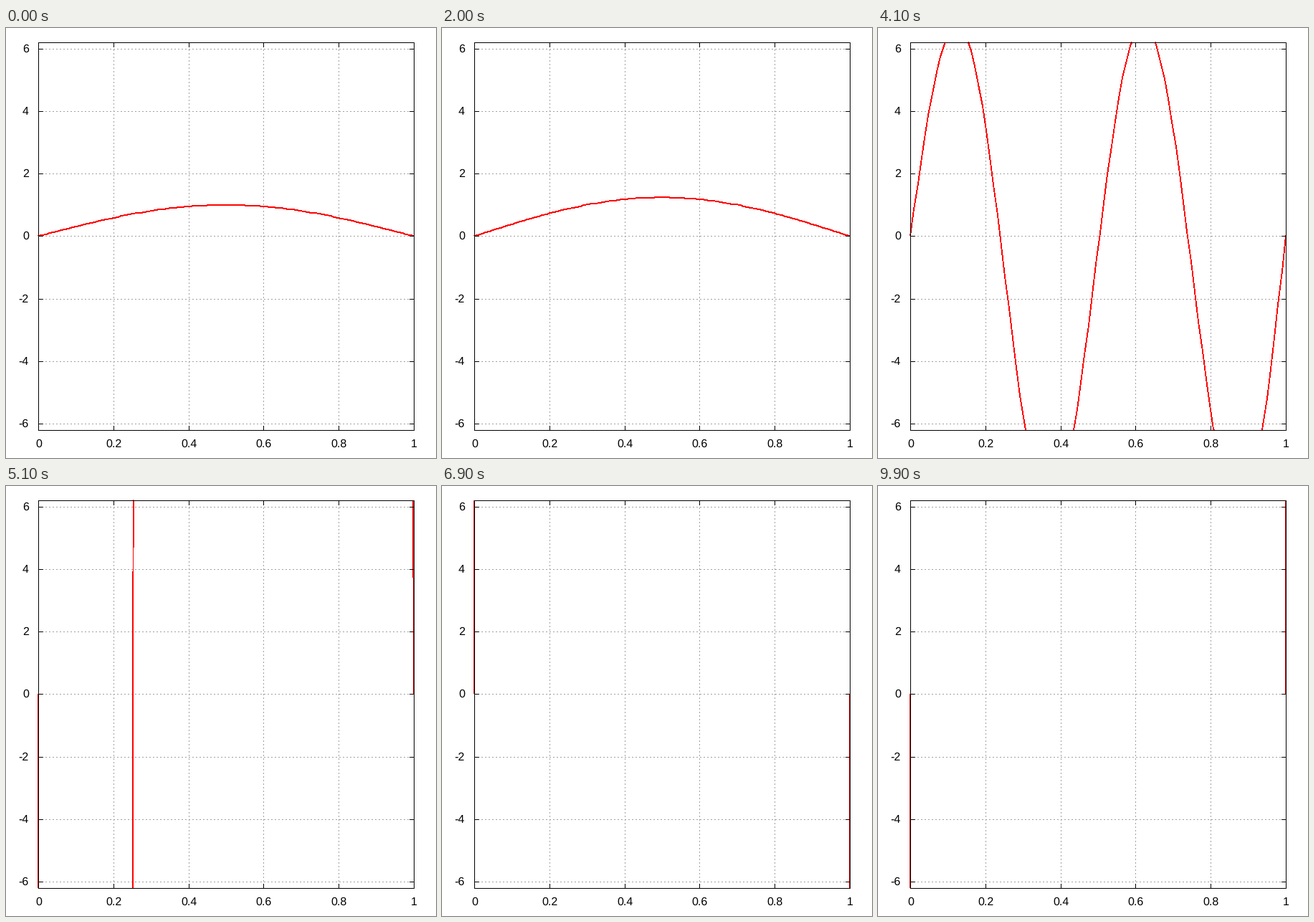
A matplotlib script for the animation above (10000 ms loop, 600 by 600 pixels).

```python
import matplotlib.pyplot as plt
import numpy as np
from matplotlib.animation import FuncAnimation
from matplotlib.patches import Rectangle

SIZE, DPI = 600, 100
PX = 72 / DPI
LEFT, RIGHT, TOP, BOTTOM = 45, 569, 20, 561
LIMIT = 6.2
FRAMES, INTERVAL = 100, 100
x = np.arange(100) / 99

plt.rcParams["text.hinting"] = "none"
fig = plt.figure(figsize=(SIZE / DPI, SIZE / DPI), dpi=DPI, facecolor="white")
ax = fig.add_axes([0, 0, 1, 1])
ax.set_xlim(0, SIZE)
ax.set_ylim(SIZE, 0)
ax.axis("off")


def to_px(v, u):
    """Data point to whole pixels."""
    px = LEFT + (RIGHT - LEFT) * v
    py = (TOP + BOTTOM) / 2 - (BOTTOM - TOP) / (2 * LIMIT) * u
    return np.round(px), np.ceil(py - 0.5)


def rule(xs, ys, color="black", z=5, **kw):
    ax.plot(xs, ys, color=color, lw=PX, zorder=z, snap=False,
            solid_capstyle="butt", dash_capstyle="butt", **kw)


def label(px, py, text, ha):
    ax.text(px, py, text, ha=ha, va="baseline", fontsize=16 * PX,
            family="Liberation Sans", color="black")


def draw_axes():
    l, r, t, b = LEFT, RIGHT + 1, TOP, BOTTOM + 1
    tick = 7
    dots = dict(color="#a0a0a0", z=1, linestyle=(0, (2, 3)))
    for k in range(6):
        gx = to_px(k / 5, 0)[0] + 0.5
        if 0 < k < 5:
            rule([gx, gx], [b, t], **dots)
        rule([gx, gx], [b, b - tick])
        rule([gx, gx], [t, t + tick])
        label(gx, 585, f"{k / 5:g}", "center")
    for v in range(-6, 7, 2):
        gy = to_px(0, v)[1] + 0.5
        rule([l, r], [gy, gy], **dots)
        rule([l, l + tick], [gy, gy])
        rule([r, r - tick], [gy, gy])
        label(32, gy + 4.2, str(v), "right")
    ax.add_patch(Rectangle((l + 0.5, t + 0.5), r - l - 1, b - t - 1,
                           fill=False, ec="black", lw=PX, zorder=5,
                           snap=False))


def wave(n):
    """Steady first mode plus unstable modes that blow up."""
    def mode(k):
        return np.sin(k * np.pi * x)

    steady = 1.273 * np.cos(1.907 * n - 0.667)
    flip = 1 if (n - 41) // 2 % 2 == 0 else -1
    fourth = 7.75 * flip * 1.52 ** (n - 41)
    odd = 1.3664 ** (n - 41)
    return (steady * mode(1) + fourth * mode(4)
            - odd * (0.45 * mode(1) + 0.55 * mode(3) + 0.18 * mode(7)))


def edge(i, j, u):
    """Where the segment from inside point i to outside point j leaves."""
    lim = np.copysign(LIMIT, u[j])
    return to_px(x[i] + (x[j] - x[i]) * (lim - u[i]) / (u[j] - u[i]), lim)


def trace(u):
    """Polyline that skips segments with both ends out of range."""
    u = u.copy()
    u[0] = u[-1] = 0
    inside = np.abs(u) <= LIMIT
    gap = (np.nan, np.nan)
    pts = []
    for i in range(len(u) - 1):
        j = i + 1
        if not (inside[i] or inside[j]):
            continue
        pts.append(to_px(x[i], u[i]) if inside[i] else edge(j, i, u))
        pts.append(to_px(x[j], u[j]) if inside[j] else edge(i, j, u))
        if not inside[j]:
            pts.append(gap)
    return np.array(pts).T


draw_axes()
# Without antialiasing every touched pixel is filled, so this is 2 px wide.
curve, = ax.plot([], [], color="#ff0000", lw=0.8 * PX, zorder=3,
                 antialiased=False, solid_capstyle="butt",
                 solid_joinstyle="round", snap=False)


def update(n):
    curve.set_data(*trace(wave(n)))
    return curve,


anim = FuncAnimation(fig, update, frames=FRAMES, interval=INTERVAL,
                     repeat=True, repeat_delay=0)
plt.show()
```
